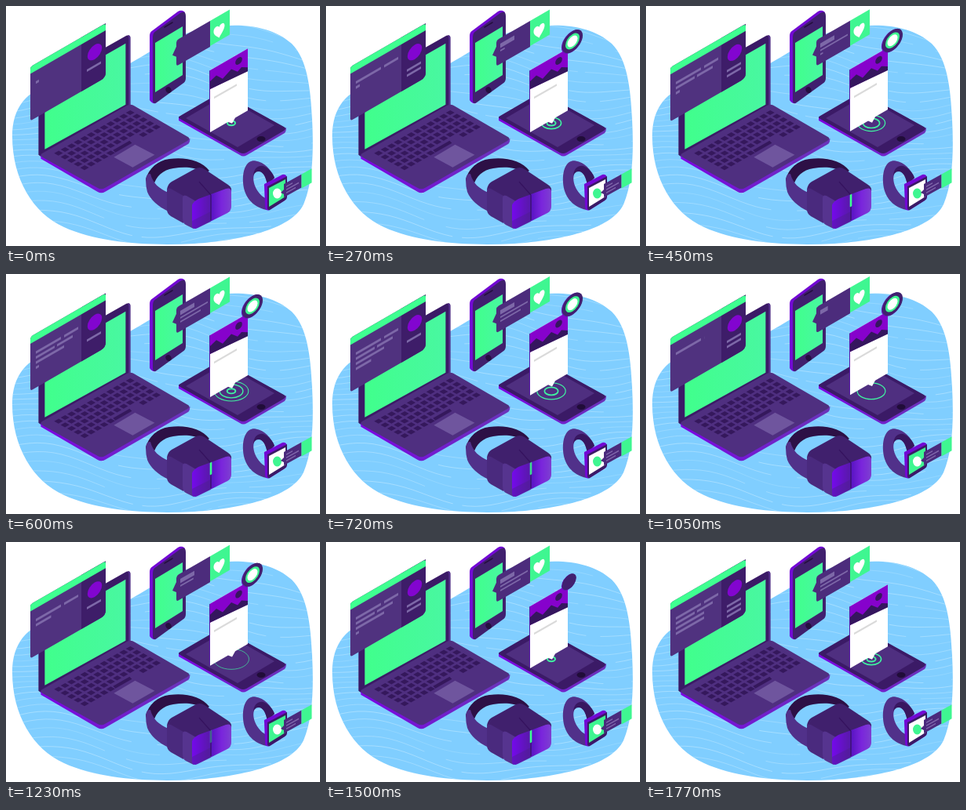
An HTML page for the animation above (1.8 s loop, 400x306 px).

```html
<!DOCTYPE html>
<html lang="en">
<head>
<meta charset="utf-8">
<title>Connected devices</title>
<style>
html, body { margin: 0; width: 100%; height: 100%; overflow: hidden; background: #fff; }
svg { display: block; width: 100vw; height: 100vh; }
</style>
</head>
<body>
<svg id="stage" viewBox="0 0 400 306" xmlns="http://www.w3.org/2000/svg">
  <defs>
    <path id="blob" d="M8 166C8 130 26 106 62 100C104 95 132 88 160 72C190 55 222 32 262 27C300 21 340 26 364 48C384 68 388 105 390 145C392 185 391 225 379 253C363 286 296 299 240 303C180 306 118 302 74 282C34 264 8 220 8 166Z"/>
    <clipPath id="inBlob"><use href="#blob"/></clipPath>
    <linearGradient id="lens"><stop offset="0" stop-color="#7409ec"/><stop offset=".42" stop-color="#5a18ad"/><stop offset=".5" stop-color="#5a14c4"/><stop offset=".75" stop-color="#7a25dc"/><stop offset="1" stop-color="#7d3fd0"/></linearGradient>
    <linearGradient id="edge"><stop offset="0" stop-color="#7b05e3"/><stop offset="1" stop-color="#6a35b8"/></linearGradient>
    <linearGradient id="glass"><stop offset="0" stop-color="#40ff8c"/><stop offset="1" stop-color="#49f7a1"/></linearGradient>
  </defs>

  <use href="#blob" fill="#80ceff"/>
  <g id="waves" clip-path="url(#inBlob)" fill="none" stroke="#c9ecff" stroke-width=".6"/>

  <g id="laptop" transform="translate(.4 .8)">
    <path d="M41 104Q41 100 45 98L153 37Q158 35 158 40V128L45 192L41 189Z" fill="#3b1a66"/>
    <path d="M155 37Q158 36 158 40V127L156 128V40Z" fill="#56308f"/>
    <path d="M49 106L152 47V125L49 182Z" fill="url(#glass)"/>
    <path d="M44 189V194L116 236Q121 239 126 236L232 175Q234 173 234 168L122 226Z" fill="url(#edge)"/>
    <path d="M46 187L154 126Q158 124 162 126L231 166Q235 168 231 171L126 231Q121 234 116 231L46 192Q42 189 46 187Z" fill="#4f2f80"/>
    <g id="keys" fill="#35185c"/>
    <path d="M137 192L164 176L189 189L161 205Z" fill="#6f559e"/>
  </g>

  <g id="phone">
    <path d="M183 41Q183 34 188 31L219 8Q225 5 229 10V93Q229 97 225 100L192 123Q187 126 183 121Z" fill="none"/>
    <path d="M183 38Q183 33 187 31L219 7Q224 4 228 8L191 124Q186 125 183 120Z" fill="#7208d4"/>
    <path d="M187 40Q187 34 191 32L222 9Q229 5 229 13V92Q229 97 225 99L192 123Q187 126 187 120Z" fill="#40206e"/>
    <path d="M190 47L225 26V88L190 110Z" fill="url(#glass)"/>
    <path d="M202 27L212 21" stroke="#25103f" stroke-width="1.600" stroke-linecap="round"/>
    <ellipse cx="207" cy="107" rx="3.500" ry="4" transform="rotate(-30 207 107)" fill="#250f40"/>
  </g>

  <g id="tablet">
    <path d="M220 141V146L298 190Q302 193 307 190L355 162Q357 160 357 155L302 184Z" fill="url(#edge)"/>
    <path d="M222 140L270 112Q274 110 278 112L354 154Q358 156 354 159L306 187Q302 189 298 187L222 144Q218 142 222 140Z" fill="#3b1a66"/>
    <path d="M229 143L277 115L342 152L295 180Z" fill="#4f2f80"/>
    <ellipse cx="325" cy="169.500" rx="5.500" ry="3.500" fill="#210d39"/>
    <g id="rings" fill="none" stroke="#3ff3a0"/>
  </g>

  <g id="headset">
    <path d="M178 221C182 207 193 197 208 195C228 192 250 197 259 210L206 240C195 237 185 231 180 226Z" fill="#2d1046"/>
    <path d="M188 229C191 217 200 209 213 207C226 205 240 205 249 211L214 228L207 240C199 237 192 233 188 229Z" fill="#80ceff"/>
    <path d="M178 221Q179 213 184 214C187 226 195 233 207 238V262C194 256 184 247 180 237Q178 230 178 221Z" fill="#51318a"/>
    <path d="M205 234Q206 227 211 224L240 208Q247 204 253 208L283 228Q288 231 287 237L240 254L222 246Z" fill="#40206d"/>
    <path d="M205 236Q205 231 210 233L226 242V277L210 268Q205 265 205 259Z" fill="#4a2a7e"/>
    <path d="M225 245Q225 240 230 242L242 249L239 284L229 279Q225 277 225 270Z" fill="#56348f"/>
    <path d="M237 254Q239 249 245 246L280 233Q287 231 287 237V256Q287 261 282 264L244 283Q237 286 237 279Z" fill="url(#lens)"/>
    <path d="M237 274L261 262V275L244 283Q237 286 237 279Z" fill="#4c2088" opacity=".4"/>
    <path d="M261 241V273M246 224L261 241" stroke="#35135f" stroke-width="1.200" fill="none"/>
    <path id="led" d="M260 241L262 240V255L260 256Z" fill="#3dff91" stroke="#3dff91" stroke-width=".6"/>
  </g>

  <g id="watch">
    <path d="M302 225C301 206 308 196 318 197.500C329 199 338 209 342 219L333 228C330 214 325 208 319 211C311 216 316 238 332 246V260C313 256 303 242 302 225Z" fill="#51318a"/>
    <path d="M315 216C316 207 321 203 328 204C335 207 340 213 342 219L333 228C331 216 326 209 319 211.500Q316 213 315 216Z" fill="#381760"/>
    <path d="M329 229Q328 227 331 226L352 215Q357 214 358 219V243Q358 246 355 248L336 260Q331 262 330 257Z" fill="#7208d4"/>
    <path d="M333 230L358 217V243Q358 246 355 248L336 260Q333 261 333 257Z" fill="#3b1a66"/>
    <path id="dial" d="M335 232L356 221V243L335 256Z"/>
    <ellipse id="dialMark" cx="345.500" cy="239" rx="5.500" ry="6.500"/>
    <g transform="matrix(1 -.555 0 1 352 228)">
      <path d="M2 0H24.500V17H2V13L-2 9L2 7Z" fill="#4b2a7c"/>
      <path d="M24.500 0H37.500V18H24.500Z" fill="#3ff691"/>
      <path d="M5 5H13M5 9H21M5 13H17" stroke="#8068ac" stroke-width="1.600"/>
    </g>
  </g>

  <g id="mailCard">
    <path d="M0 3Q0 0 3 0H93Q96 0 96 3V63Q96 69 90 69H3Q0 69 0 66Z" fill="#50327f"/>
    <path d="M65 0H96V63Q96 69 90 69H65Z" fill="#3e1d69"/>
    <path d="M0 9V3Q0 0 3 0H93Q96 0 96 3V9Z" fill="#3fff91"/>
    <circle cx="82" cy="28.500" r="9.200" fill="#8205d0"/>
    <g id="mailText" fill="#7d68a8"/>
    <g id="sideText" fill="#7d68a8"/>
  </g>

  <g id="chat">
    <path d="M5 0H45V33H5Q2 33 2 30V21L-3 16L2 8V3Q2 0 5 0Z" fill="#4c2c7c"/>
    <path d="M45 0H70V32H45Z" fill="#3ff691"/>
    <path d="M56.500 28C52 23 49.500 20 49.500 16.500C49.500 11 55 10.500 56.500 14.500C58 10.500 63.500 11 63.500 16.500C63.500 20 61 23 56.500 28Z" fill="#fff"/>
    <g id="chatText" fill="#7d68a8"/>
  </g>

  <g id="photoCard">
    <path d="M-1 0L0 0V78H-1Z" fill="#5a17a8"/>
    <path d="M0 0H48V79H32L28 84L23 79H0Z" fill="#fff"/>
    <path d="M0 0H48V28L0 24Z" fill="#8602cc"/>
    <path d="M0 14L8 11L16 20L27 14L35 22L40 19L48 24V29L0 24Z" fill="#35165e"/>
    <circle cx="36.500" cy="9" r="4.300" fill="#35165e"/>
    <path d="M5 38H34" stroke="#dadada" stroke-width="2.500"/>
  </g>

  <g id="coin">
    <circle cx="-.8" cy="0" r="13.300" fill="#6415b5"/>
    <circle r="13" fill="#41216f"/>
    <g id="coinFace"><circle r="9" fill="#3ff691"/><circle r="6.500" fill="#fff"/></g>
  </g>
</svg>
<script>
const LOOP = 1800, NS = "http://www.w3.org/2000/svg";
const $ = id => document.getElementById(id);
const set = (el, attrs) => { for (const k in attrs) el.setAttribute(k, attrs[k]); };
const add = (parent, tag, attrs = {}) => {
  const el = document.createElementNS(NS, tag);
  set(el, attrs);
  return parent.appendChild(el);
};
const ramp = (t, a, b) => Math.max(0, Math.min(1, (t - a) / (b - a)));
const iso = (id, x, y, extra = "") =>
  set($(id), { transform: `matrix(1 -.577 0 1 ${x} ${y}) ${extra}` });

// Keyboard: five staggered rows on the laptop deck.
for (let row = 0; row < 5; row++) {
  for (let col = 0; col < 12; col++) {
    if (row === 4 && col > 4 && col < 9) continue;
    const x = 61 + col * 8.3 + row * 8.3, y = 187 - col * 4.7 + row * 4.6;
    add($("keys"), "path", { d: `M${x} ${y}l5.700 -3.200l5.400 3l-5.700 3.200z` });
  }
}
add($("keys"), "path", { d: "M136 183L157 171L160 174L139 186Z" });

const waves = Array.from({ length: 32 }, (_, i) => add($("waves"), "path", {
  opacity: .35 + .5 * Math.abs(Math.sin(i * 2.3)),
  "stroke-dasharray": `${120 + (i * 37) % 110} ${8 + (i * 13) % 30}`
}));

// Each typed bar: x, y, width, height, start and end of its reveal.
const typedBars = (id, bars) => bars.map(([x, y, w, h, from, to]) =>
  ({ el: add($(id), "rect", { x, y, height: h }), w, from, to }));
const typed = [
  ...typedBars("mailText", [
    [7, 22.5, 32, 3.2, -20, 150], [43, 22.5, 18, 3.2, 150, 250],
    [7, 29, 24, 3.2, 250, 350], [34, 29, 20, 3.2, 350, 430],
    [7, 35.5, 36, 3.2, 430, 580], [7, 42, 36, 3.2, 570, 850]
  ]),
  ...typedBars("chatText", [
    [7, 7, 18, 5.5, 60, 230], [7, 15, 35, 2, 240, 430], [7, 20, 26, 2, 430, 590]
  ])
];
const sideBars = [45, 51.5, 58].map(y =>
  add($("sideText"), "rect", { x: 72, y, width: 18, height: 3 }));
const rings = [0, 250, 590].map(delay => ({ el: add($("rings"), "ellipse", { cx: 287, cy: 149.3 }), delay }));

function drawWaves(t) {
  const phase = t / LOOP * Math.PI * 2;
  waves.forEach((el, i) => {
    let d = "";
    for (let x = 0; x <= 400; x += 10) {
      const y = i * 10 - 10 + 13 * Math.sin(x / 58 + i * .16 + .25 * Math.sin(phase))
        + 4 * Math.sin(x / 27 - i * .4 + .3 * Math.cos(phase)) + x * .05;
      d += (x ? "L" : "M") + x + " " + y.toFixed(1);
    }
    set(el, { d });
  });
}

function drawRing({ el, delay }, time) {
  const age = time - delay, r = Math.min(22.5, 5 + Math.max(0, age) * .028);
  set(el, {
    rx: r, ry: r * .58,
    opacity: age < 0 ? 0 : 1 - ramp(age, 610, 700),
    "stroke-width": 2 - ramp(r, 5, 22)
  });
}

function render(t) {
  const beat = t % 900, pulse = t % 1500;
  const lift = t > 300 && t < 1500 ? (1 - Math.cos((t - 300) / 600 * Math.PI)) / 2 : 0;

  drawWaves(t);
  iso("mailCard", 31, 77.5 + 5 * lift);
  iso("chat", 215, 45 - 2 * lift);
  iso("photoCard", 260, 82 - 8 * lift);

  for (const { el, w, from, to } of typed) set(el, { width: w * ramp(beat, from, to) });
  sideBars.forEach((el, i) => set(el, { opacity: ramp(t % 600, i * 260 - 60, i * 260) }));

  const size = ramp(t, 30, 220) * (1 - ramp(t, 1440, 1640));
  iso("coin", 300 + 14 * size, 64 - 19 * size - 8 * lift, `scale(${size})`);
  set($("coinFace"), { transform: `scale(${ramp(t, 100, 260) * (1 - ramp(t, 1350, 1480))})` });

  rings.forEach(ring => drawRing(ring, pulse));

  const white = pulse > 200 && pulse < 750;
  set($("dial"), { fill: white ? "#fff" : "#3ff691" });
  set($("dialMark"), { fill: white ? "#3ff691" : "#fff" });
  set($("led"), { opacity: ramp(beat, 280, 430) * (1 - ramp(beat, 700, 840)) });
}

const start = performance.now();
function tick() {
  render((performance.now() - start) % LOOP);
  requestAnimationFrame(tick);
}
tick();
</script>
</body>
</html>
```
